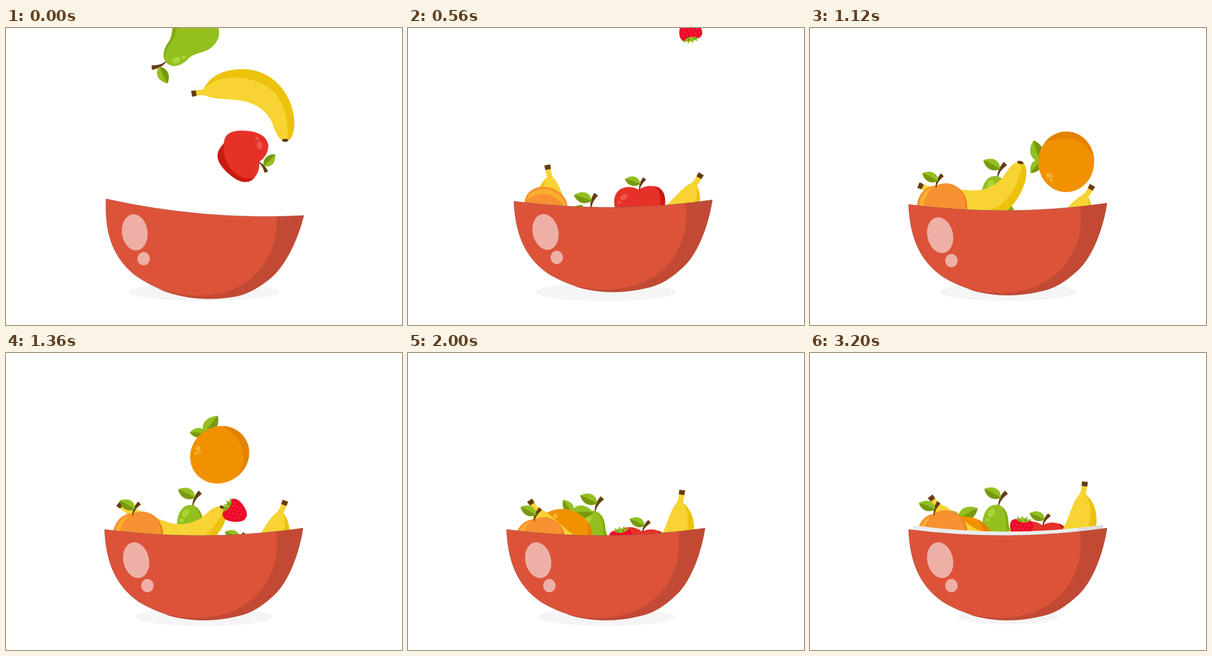
Animation, 864 px wide and 648 px high, one loop 3.24 s. Source, as an HTML page without scripts:

```html
<!DOCTYPE html>
<html lang="en">
<head>
<meta charset="utf-8">
<title>Fruit bowl</title>
<style>
html, body { margin: 0; width: 100%; height: 100%; overflow: hidden; background: #fff; }
svg { display: block; width: 100%; height: 100%; }

.move { animation: 3240ms steps(7) infinite; }
.apple { animation-name: apple; }
.pear { animation-name: pear; }
.orange { animation-name: orange; }
.banana-a { animation-name: banana-a; }
.banana-b { animation-name: banana-b; }
.peach { animation-name: peach; }
.berry { animation-name: berry; }
.bowl { animation-name: bowl; transform-origin: 432px 384px; }
.shadow { animation-name: shadow; transform-origin: 432px 576px; }
.lift { animation-name: lift; }
.rim { animation-name: rim; }

.leaf-light { fill: #93c020; }
.leaf-dark { fill: #78990f; }
.wood { fill: #653c12; }

/* Falls run at 25 frames a second, the settling at half that rate. */
@keyframes bowl {
  0% { transform: translate(2.5px, 7.5px) rotate(5.2deg); animation-timing-function: steps(4); }
  4.93% { transform: translate(-42px, 2px) rotate(-1deg); animation-timing-function: steps(3); }
  8.64% { transform: translate(-21.5px, -11.5px) rotate(-6.2deg); animation-timing-function: steps(5); }
  14.81% { transform: translate(22px, -9px) rotate(-2deg); animation-timing-function: steps(2); }
  17.28% { transform: translate(16px, -7px) rotate(0deg); animation-timing-function: steps(14); }
  34.56%, 100% { transform: translate(0, 0) rotate(0deg); }
}
@keyframes shadow {
  0% { transform: scale(1.1, 1); }
  8.64% { transform: scale(1.05, 1); }
  17.28% { transform: scale(1.02, 1); animation-timing-function: steps(14); }
  34.56%, 98.76% { transform: scale(1, 1); }
  98.77%, 100% { transform: scale(.727, .84); }
}
@keyframes lift {
  0%, 98.76% { transform: translateY(0); }
  98.77%, 100% { transform: translateY(-19px); }
}
@keyframes rim {
  0%, 98.76% { opacity: 0; }
  98.77%, 100% { opacity: 1; }
}
@keyframes apple {
  0% { transform: translate(514px, 274px) rotate(115deg); animation-timing-function: steps(4); }
  4.93% { transform: translate(505px, 440px) rotate(60deg); animation-timing-function: steps(3); }
  8.64% { transform: translate(500px, 467px) rotate(30deg); }
  17.28% { transform: translate(506px, 395px) rotate(-3deg); animation-timing-function: steps(14); }
  34.56% { transform: translate(500px, 482px) rotate(0deg); }
  51.85% { transform: translate(507px, 428px) rotate(8deg); animation-timing-function: steps(10); }
  76.54%, 100% { transform: translate(505px, 437px) rotate(3deg); }
}
@keyframes pear {
  0% { transform: translate(397px, 24px) rotate(-140deg); }
  8.64% { transform: translate(409px, 373px) rotate(-50deg); }
  17.28% { transform: translate(404px, 463px) rotate(-8deg); animation-timing-function: steps(14); }
  34.56% { transform: translate(401px, 393px) rotate(3deg); }
  51.85% { transform: translate(400px, 413px) rotate(0deg); }
  69.13% { transform: translate(403px, 415px) rotate(2deg); animation-timing-function: steps(3); }
  76.54%, 100% { transform: translate(403px, 420px) rotate(3deg); }
}
@keyframes orange {
  0%, 22.22% { transform: translate(600px, -80px) rotate(-150deg); }
  30.86% { transform: translate(574px, 340px) rotate(-40deg); animation-timing-function: steps(3); }
  34.56% { transform: translate(559px, 292px) rotate(0deg); animation-timing-function: steps(1); }
  37.03% { transform: translate(528px, 251px) rotate(18deg); animation-timing-function: steps(2); }
  41.97% { transform: translate(466px, 222px) rotate(54deg); animation-timing-function: steps(2); }
  46.91% { transform: translate(403px, 264px) rotate(91deg); animation-timing-function: steps(2); }
  51.85% { transform: translate(341px, 378px) rotate(127deg); animation-timing-function: steps(10); }
  76.54%, 100% { transform: translate(335px, 437px) rotate(78deg); }
}
@keyframes banana-a {
  0% { transform: translate(530px, 165px) rotate(0deg); }
  8.64% { transform: translate(546px, 400px) rotate(104deg); }
  17.28% { transform: translate(543px, 400px) rotate(130deg); animation-timing-function: steps(11); }
  30.86% { transform: translate(543px, 408px) rotate(118deg); animation-timing-function: steps(3); }
  34.56% { transform: translate(521px, 427px) rotate(129deg); }
  51.85% { transform: translate(542px, 413px) rotate(106deg); animation-timing-function: steps(10); }
  76.54%, 100% { transform: translate(543px, 413px) rotate(107deg); }
}
@keyframes banana-b {
  0%, 3.7% { transform: translate(400px, -140px) rotate(270deg); animation-timing-function: steps(4); }
  8.64% { transform: translate(380px, 118px) rotate(212deg); }
  17.28% { transform: translate(363px, 411px) rotate(72deg); animation-timing-function: steps(14); }
  34.56% { transform: translate(363px, 352px) rotate(14deg); }
  51.85% { transform: translate(367px, 393px) rotate(48deg); animation-timing-function: steps(10); }
  76.54%, 100% { transform: translate(367px, 403px) rotate(44deg); }
}
@keyframes peach {
  0%, 6.17% { transform: translate(262px, -95px) rotate(-65deg); animation-timing-function: steps(2); }
  8.64% { transform: translate(266px, 22px) rotate(-105deg); }
  17.28% { transform: translate(298px, 402px) rotate(-250deg); animation-timing-function: steps(14); }
  34.56% { transform: translate(288px, 390px) rotate(-360deg); }
  51.85% { transform: translate(288px, 406px) rotate(-355deg); animation-timing-function: steps(10); }
  76.54%, 100% { transform: translate(289px, 414px) rotate(-367deg); }
}
@keyframes berry {
  0%, 16.04% { transform: translate(620px, -50px) rotate(150deg); animation-timing-function: steps(1); }
  17.28% { transform: translate(615px, 4px) rotate(165deg); animation-timing-function: steps(6); }
  24.69% { transform: translate(550px, 430px) rotate(270deg); animation-timing-function: steps(8); }
  34.56% { transform: translate(511px, 424px) rotate(360deg); animation-timing-function: steps(4); }
  44.44% { transform: translate(496px, 320px) rotate(280deg); animation-timing-function: steps(3); }
  51.85% { transform: translate(487px, 327px) rotate(240deg); animation-timing-function: steps(4); }
  61.72% { transform: translate(465px, 408px) rotate(350deg); animation-timing-function: steps(6); }
  76.54%, 100% { transform: translate(461px, 404px) rotate(363deg); }
}
</style>
</head>
<body>
<svg viewBox="0 0 864 648">
  <defs>
    <g id="leaf">
      <path class="leaf-light" d="M0 0C-8-17-27-17-41 0C-28 15-10 14 0 0Z"/>
      <path class="leaf-dark" d="M0 0C-14-1-28-2-41 0C-28 15-10 14 0 0Z"/>
    </g>
    <path id="stem" class="wood" d="M0 0C0-11 4-23 13-33L20-26C11-19 4-11 2 1Z"/>
    <g id="banana">
      <path fill="#f7d333" d="M-116-29L-99-31C-85-62-52-75-15-75C50-76 96-22 99 38C99 58 96 74 86 80L72 79C62 74 56 58 50 40C38 15 15 0-10-5C-40-11-65-9-85-14C-95-18-100-20-115-17Z"/>
      <path fill="#ecc20c" d="M-99-31C-85-62-52-75-15-75C50-76 96-22 99 38C99 58 96 74 86 80L84 78C88 40 76-5 55-25C30-48 0-57-35-57C-65-57-85-45-99-31Z"/>
      <path class="wood" d="M-126-28L-116-29L-114-17L-124-15Z"/>
      <ellipse class="wood" cx="79" cy="80" rx="7" ry="3.5"/>
    </g>
  </defs>

  <ellipse class="move shadow" cx="432" cy="576" rx="150" ry="19.5" fill="#f5f5f5"/>

  <g class="move lift">
    <g class="move pear">
      <use href="#stem" transform="translate(4 -69)"/>
      <use href="#leaf" transform="translate(9 -86) rotate(25)"/>
      <path fill="#93c01f" d="M0-70C-16-70-26-55-28-35C-29-10-52 0-52 28C-52 56-32 70 0 70C32 70 52 56 52 28C52 0 29-10 28-35C26-55 16-70 0-70Z"/>
      <path fill="#83ab10" d="M10-67C20-62 26-52 28-35C29-10 52 0 52 28C52 56 32 70 0 70C30 60 41 45 41 28C41 8 24-6 23-30C23-45 18-60 10-67Z"/>
      <g fill="#abd534">
        <ellipse cx="-10" cy="-52" rx="6.5" ry="10" transform="rotate(30 -10 -52)"/>
        <circle cx="-18" cy="-36" r="4"/>
      </g>
    </g>

    <g class="move apple">
      <path fill="#e63129" d="M0-42C-14-52-34-51-44-43C-60-30-57-5-48 15C-40 36-28 48-15 47C-8 47-5 44 0 44C5 44 8 48 16 48C28 48 40 36 48 15C57-5 60-30 44-43C34-51 14-52 0-42Z"/>
      <path fill="#cb1811" d="M34-48C44-47 58-38 56-12C52 15 40 48 16 48C6 48-2 45-6 44C22 40 46 8 46-15C46-32 42-42 34-48Z"/>
      <g fill="#f1544b">
        <ellipse cx="-33" cy="-28" rx="9" ry="6" transform="rotate(-30 -33 -28)"/>
        <circle cx="-44" cy="-17" r="3.5"/>
      </g>
      <use href="#stem" transform="translate(0 -41) scale(.85)"/>
      <use href="#leaf" transform="translate(4 -55) rotate(20) scale(.87)"/>
    </g>

    <g class="move orange">
      <use href="#leaf" transform="translate(-56 0) rotate(72) scale(1.2 -1.2)"/>
      <use href="#leaf" transform="translate(-54 -4) rotate(-50) scale(.9)"/>
      <ellipse rx="61" ry="66" fill="#f29100"/>
      <path fill="#e38200" d="M-47-42C-34-58-18-66 0-66C36-66 61-36 61 0C52-38 16-66-47-42Z"/>
      <g fill="#f9b233">
        <ellipse cx="-39" cy="30" rx="4.5" ry="6"/>
        <ellipse cx="-31" cy="31" rx="2.5" ry="4"/>
        <ellipse cx="-33" cy="40" rx="3" ry="4"/>
      </g>
    </g>

    <use class="move banana-a" href="#banana"/>
    <g class="move banana-b"><use href="#banana" transform="scale(1 -1)"/></g>

    <g class="move berry">
      <path fill="#ee0a2a" d="M-20-20C-8-25 8-25 20-20C30-12 24 8 12 22C6 29-6 29-12 22C-24 8-30-12-20-20Z"/>
      <path d="M-19-10H20M-15-2H18M-14 6H14M-8 14H9" fill="none" stroke="#ff7d8c" stroke-width="1.8" stroke-linecap="round" stroke-dasharray="0 9"/>
      <path class="leaf-light" d="M-16-24L-9-21L-10-29L-3-23L1-30L5-23L12-29V-22L22-24L14-17L4-15L-6-17Z"/>
      <path class="leaf-dark" d="M-9-21L-3-23L-1-16ZM5-23L12-22L6-15Z"/>
    </g>

    <g class="move peach">
      <ellipse cx="-15" cy="2" rx="40" ry="48" fill="#f79131"/>
      <ellipse cx="-14" cy="2" rx="36" ry="44" fill="#f9b02f"/>
      <ellipse cx="8" cy="-1" rx="47" ry="50" fill="#ec7f21"/>
      <path fill="#f79131" d="M8-51C-18-51-39-28-39-1C-39 27-18 49 8 49C38 49 51 26 51 4C51-30 34-51 8-51Z"/>
      <use href="#stem" transform="translate(-14 -43) scale(.9)"/>
      <use href="#leaf" transform="translate(-9 -56) rotate(27) scale(.93)"/>
    </g>
  </g>

  <g class="move rim">
    <path fill="#ececec" d="M225 376Q432 404 640 375V384Q432 414 225 387Z"/>
    <path fill="#dedede" d="M584 382Q615 379 640 375V384L584 391Z"/>
  </g>

  <g class="move bowl">
    <path fill="#dd5339" stroke="#8f5a4c" stroke-width=".7" d="M215 385Q432 413 648 382C640 435 618 495 588 525C560 552 535 568 505 574C480 580 455 583 430 583C385 583 335 570 290 543C235 505 218 450 215 385Z"/>
    <path fill="#c24a34" d="M589 389Q620 387 648 382C640 435 618 495 588 525C560 552 535 568 505 574C480 580 455 583 430 583C400 583 370 578 345 570C440 590 520 572 565 505C590 465 594 430 589 389Z"/>
    <g fill="#eeb0a6">
      <ellipse cx="284" cy="452" rx="28" ry="39.5" transform="rotate(-13 284 452)"/>
      <ellipse cx="308.500" cy="507.500" rx="13.500" ry="14.500"/>
    </g>
  </g>
</svg>
</body>
</html>
```
